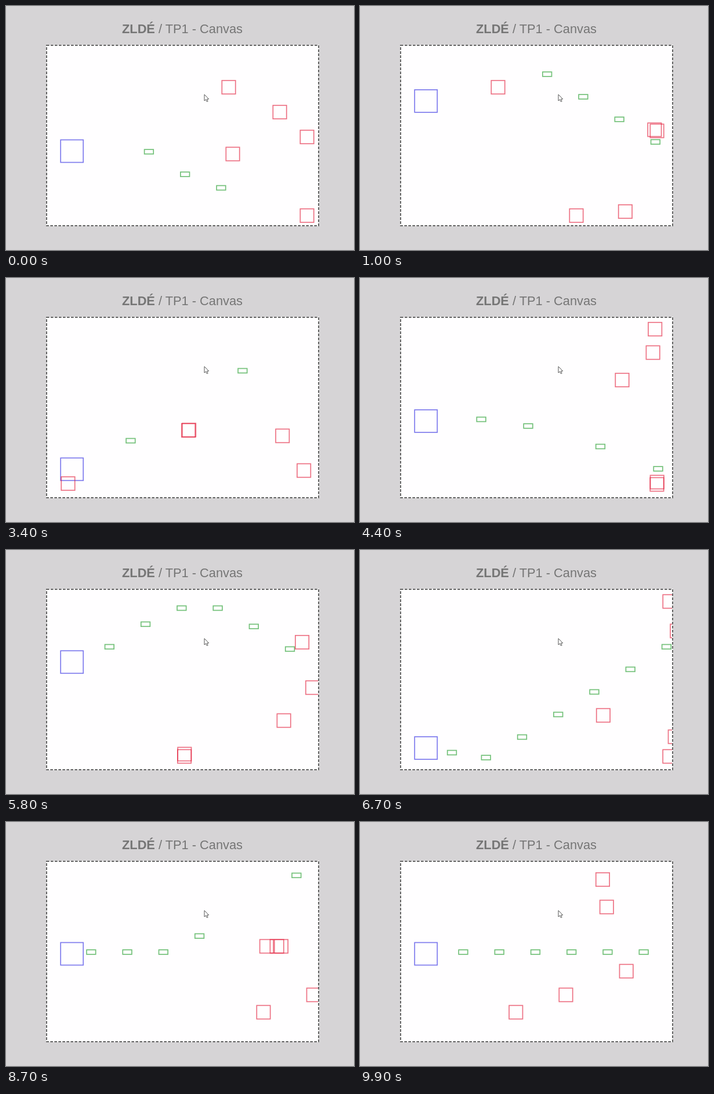
An HTML page with a canvas that plays this animation: 600x422 px, repeating every 10000 ms.

```html
<!DOCTYPE html>
<html lang="fr">
<head>
<meta charset="utf-8">
<title>TP1 - Canvas</title>
<style>
  html, body { margin: 0; width: 100%; height: 100%; overflow: hidden; background: #d6d4d6; }
  h1 {
    position: absolute; left: 200px; top: 27px; margin: 0;
    font: 21.8px/25px "Liberation Sans", Arial, sans-serif;
    color: #757575; white-space: nowrap;
  }
  canvas { position: absolute; left: 71px; top: 69px; background: #fffeff; }
  svg { position: absolute; left: 0; top: 0; width: 100%; height: 100%; }
</style>
</head>
<body>
<h1><b>ZLDÉ</b> / TP1 - Canvas</h1>
<canvas id="game" width="467" height="310"></canvas>
<svg>
  <g fill="none" stroke-width="2">
    <rect x="70" y="68" width="469" height="312" stroke="#fffeff"/>
    <rect x="70" y="68" width="469" height="312" stroke="#666" stroke-dasharray="4.67 2.33"/>
  </g>
  <path d="M342 153v11l2.5-2.3 1.8 3.8 1.8-.8-1.7-3.7h3.3z" fill="#fff" stroke="#555"/>
</svg>
<script>
const LOOP = 10000, STEP = 100;

// Speeds in px per ms
const SHIP_SPEED = 0.244, BULLET_SPEED = 0.389, ENEMY_SPEED = 0.146;
const SHIP_X = 113.7, MUZZLE_X = 141, SPAWN_X = 550, EXIT_X = 59;
const FIRE_GAP = 160, REACH_X = 18, REACH_Y = 16;

const ship = { w: 39, h: 39, color: "rgba(40,35,225,.6)" };
const bullet = { w: 15.6, h: 7.8, color: "rgba(40,160,50,.65)" };
const enemy = { w: 23.4, h: 23.4, color: "rgba(225,20,50,.6)" };

// Steering: from this time, head for this height
const START_Y = 317.5;
const moves = [
  [-527, 251], [0, 88], [687, 263], [1409, 88], [2405, 333], [3539, 259],
  [4060, 247.5], [4604, 103.5], [5430, 362], [6620, 88], [7745, 228]
];

// Trigger: first shot, number of shots
const bursts = [
  [-591, 3], [53, 4], [1185, 7], [2714, 1], [3210, 1], [3441, 1],
  [3697, 1], [4017, 1], [4225, 1], [4904, 11], [6655, 8], [8205, 11]
];

// Five enemies: x at the start, then the height of each life
const lanes = [
  { x: 384, heights: [140.5, 85, 273, 280, 88.5, 238, 323, 207, 92, 299] },
  { x: 472, heights: [183.5, 216, 263, 353, 89, 215, 147] },
  { x: 519, heights: [226.5, 214, 263.5, 357, 357, 157, 215, 225, 258] },
  { x: 391, heights: [256, 314, 355.5, 176.5, 295, 140, 329] },
  { x: 519, heights: [362.5, 333, 129, 159.5, 286, 145, 215, 99.5] }
];

function shipY(t) {
  let y = START_Y;
  moves.forEach(([from, target], i) => {
    const until = Math.min(t, moves[i + 1]?.[0] ?? LOOP);
    const step = SHIP_SPEED * Math.max(0, until - from);
    y += Math.max(-step, Math.min(step, target - y));
  });
  return y;
}

const shots = bursts.flatMap(([first, count]) =>
  Array.from({ length: count }, (_, i) => {
    const time = first + i * FIRE_GAP;
    return { time, y: shipY(time) - 3 };
  }));

// When a shot meets an enemy born at the right edge
function meeting(shot, born) {
  const gap = SPAWN_X - MUZZLE_X - REACH_X;
  return (gap + BULLET_SPEED * shot.time + ENEMY_SPEED * born) / (BULLET_SPEED + ENEMY_SPEED);
}

// An enemy lives until it is hit or has left the field, then the next one enters
function livesOf({ x, heights }) {
  let born = (x - SPAWN_X) / ENEMY_SPEED;
  return heights.map(y => {
    const life = { y, born };
    const hits = shots
      .filter(s => Math.abs(s.y - y) < REACH_Y)
      .map(s => ({ fired: s.time, at: meeting(s, born) }))
      .filter(h => h.at > born && h.at > h.fired)
      .map(h => h.at);
    born = life.end = Math.min(born + (SPAWN_X - EXIT_X) / ENEMY_SPEED, ...hits);
    return life;
  });
}
const enemies = lanes.flatMap(livesOf);

const ctx = document.getElementById("game").getContext("2d");
ctx.translate(-71, -69);
ctx.lineWidth = 1.7;

function box({ w, h, color }, x, y) {
  ctx.strokeStyle = color;
  ctx.strokeRect(x - w / 2, y - h / 2, w, h);
}

function draw(t) {
  ctx.clearRect(71, 69, 467, 310);
  box(ship, SHIP_X, shipY(t));
  for (const { time, y } of shots) {
    if (t >= time) box(bullet, MUZZLE_X + (t - time) * BULLET_SPEED, y);
  }
  for (const { y, born, end } of enemies) {
    if (t >= born && t < end) box(enemy, SPAWN_X - (t - born) * ENEMY_SPEED, y);
  }
}

const start = performance.now();
function tick() {
  const t = (performance.now() - start) % LOOP;
  draw(Math.floor(t / STEP) * STEP);
  requestAnimationFrame(tick);
}
tick();
</script>
</body>
</html>
```
